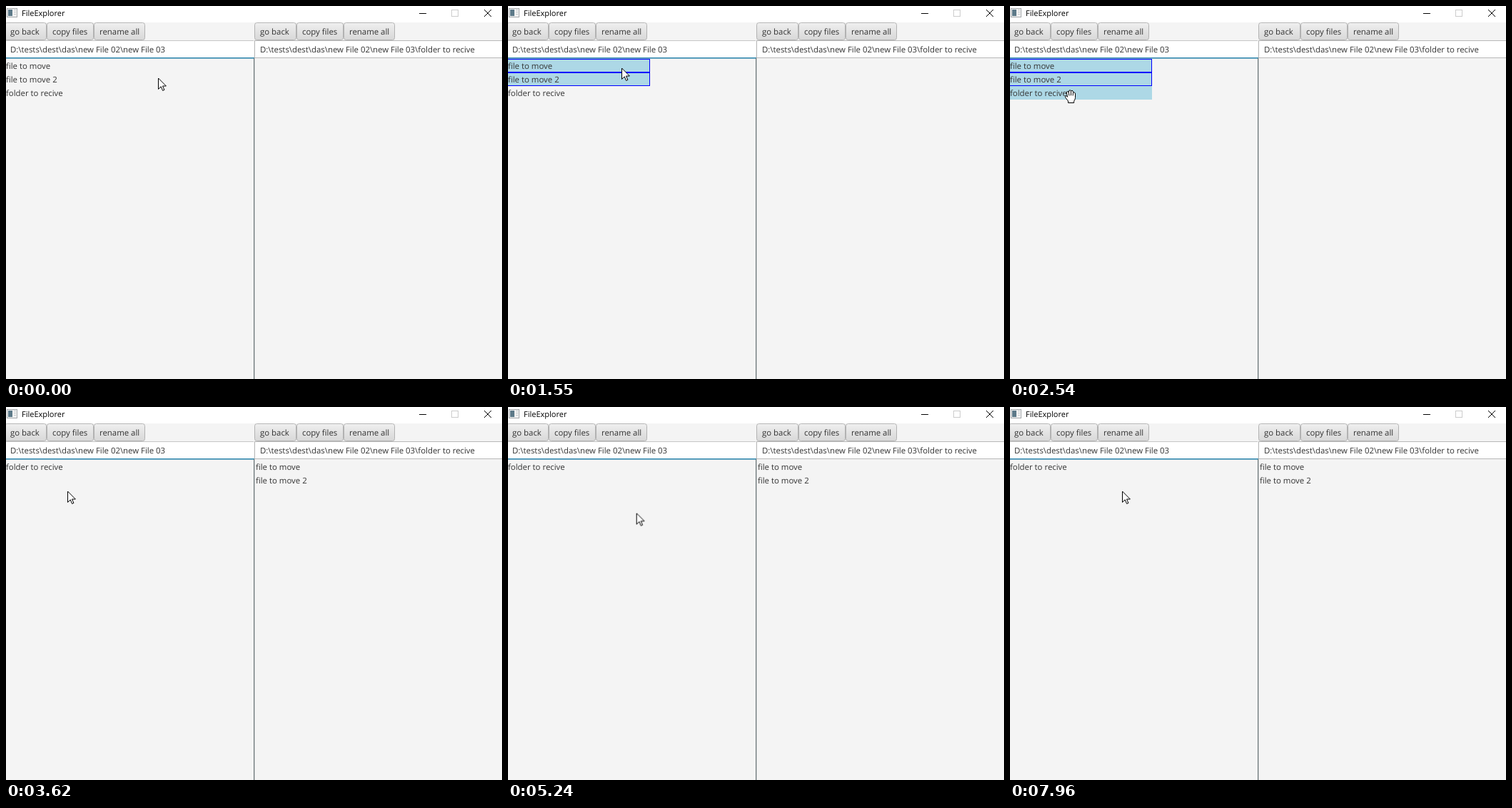
An HTML page for the animation above (8000 ms loop, 695 by 522 pixels).

```html
<!DOCTYPE html>
<html lang="en">
<head>
<meta charset="utf-8">
<title>FileExplorer</title>
<style>
html, body { margin: 0; width: 100%; height: 100%; overflow: hidden; background: #f4f4f4; }
svg { display: block; }
text { font: 11.4px "Open Sans", "Noto Sans", sans-serif; fill: #333; text-rendering: geometricPrecision; white-space: pre; }
.title { font-size: 11px; fill: #000; }
.button { fill: url(#face); stroke: #b2b2b2; }
.row rect { fill: none; stroke: none; }

.cursor, .row rect, .before, .after, .arrow, .hand { animation: 8s step-end infinite; }
.cursor { animation-name: move; }
.first  { animation-name: pick-first !important; }
.second { animation-name: pick-second !important; }
.third  { animation-name: hover-third !important; }
.before { animation-name: before; }
.after  { animation-name: after; }
.arrow  { animation-name: arrow; }
.hand   { animation-name: hand; }

@keyframes move {
  0%      { transform: translate(213px, 100px); }
  4.75%   { transform: translate(214px, 100px); }
  9.5%    { transform: translate(214px, 100px); animation-timing-function: steps(10, jump-both); }
  19.375% { transform: translate(159px, 86px); }
  20.25%  { transform: translate(159px, 86px); animation-timing-function: steps(1, jump-both); }
  21.125% { transform: translate(101px, 82px); }
  24%     { transform: translate(101px, 82px); animation-timing-function: steps(8, jump-both); }
  31.75%  { transform: translate(85px, 117px); }
  45.25%  { transform: translate(86px, 117px); animation-timing-function: steps(10); }
  54.875% { transform: translate(146px, 143px); }
  55.875% { transform: translate(149px, 144px); animation-timing-function: steps(7); }
  62.625% { transform: translate(180px, 149px); }
  65.5%   { transform: translate(180px, 149px); animation-timing-function: steps(5, jump-both); }
  70.25%  { transform: translate(178px, 141px); }
  74.25%  { transform: translate(178px, 141px); animation-timing-function: steps(2, jump-both); }
  76.125% { transform: translate(180px, 140px); }
  93.75%  { transform: translate(180px, 140px); animation-timing-function: steps(6, jump-both); }
  99.5%, 100% { transform: translate(157px, 117px); }
}
@keyframes pick-second {
  0%    { fill: none; stroke: none; }
  12.4% { fill: #add8e6; stroke: none; }
  14.4%, 100% { fill: #add8e6; stroke: #00f; }
}
@keyframes pick-first {
  0%    { fill: none; stroke: none; }
  16.4% { fill: #add8e6; stroke: none; }
  18.4%, 100% { fill: #add8e6; stroke: #00f; }
}
@keyframes hover-third {
  0% { fill: none; }
  29.8%, 100% { fill: #add8e6; }
}
@keyframes before {
  0% { visibility: visible; }
  34.625%, 100% { visibility: hidden; }
}
@keyframes after {
  0% { visibility: hidden; }
  34.625%, 100% { visibility: visible; }
}
@keyframes arrow {
  0% { visibility: visible; }
  24% { visibility: hidden; }
  34.625%, 100% { visibility: visible; }
}
@keyframes hand {
  0% { visibility: hidden; }
  24% { visibility: visible; }
  34.625%, 100% { visibility: hidden; }
}
</style>
</head>
<body>
<svg width="695" height="522" viewBox="0 0 695 522">
  <defs>
    <linearGradient id="face" x2="0" y2="1">
      <stop offset="0" stop-color="#fafafa"/>
      <stop offset=".08" stop-color="#ededed"/>
      <stop offset="1" stop-color="#d8d8d8"/>
    </linearGradient>
    <g id="tools">
      <rect class="button" x="-1.5" y="23.5" width="58" height="24" rx="3"/>
      <rect class="button" x="57.5" y="23.5" width="65" height="24" rx="3"/>
      <rect class="button" x="123.5" y="23.5" width="71" height="24" rx="3"/>
      <text x="6" y="40">go back</text>
      <text x="65" y="40">copy files</text>
      <text x="131" y="40">rename all</text>
    </g>
  </defs>

  <rect width="695" height="522" fill="#f4f4f4"/>

  <!-- Title bar -->
  <rect width="695" height="23" fill="#fff"/>
  <rect x="1.5" y="3.5" width="14" height="12" fill="#f2f2f2" stroke="#a5a9ac"/>
  <rect x="3" y="5" width="6" height="9" fill="#5d7a89"/>
  <path d="M11 5.5h3M11 8.5h3M11 11.5h3" stroke="#c2c7ca"/>
  <text class="title" x="22" y="14">FileExplorer</text>
  <g fill="none" stroke="#000">
    <path d="M579 10.5h10"/>
    <rect x="624.5" y="5.5" width="9" height="9" stroke="#ccc"/>
    <path d="M670 5l10 10m0-10l-10 10"/>
  </g>

  <!-- Toolbars and path fields -->
  <use href="#tools"/>
  <use href="#tools" x="350"/>
  <rect x="-2" y="49" width="349" height="23" fill="#fff"/>
  <path d="M0 48.5H347" stroke="#c6c6c6"/>
  <rect x="348.5" y="48.5" width="350" height="24" fill="#fff" stroke="#b8b8b8"/>
  <rect y="72" width="348" height="1.6" fill="#2f86ad"/>
  <rect x="347" y="73" width="1.3" height="449" fill="#6a7478"/>
  <text x="6" y="65">D:\tests\dest\das\new File 02\new File 03</text>
  <text x="356" y="65">D:\tests\dest\das\new File 02\new File 03\folder to recive</text>

  <!-- File lists -->
  <g class="before">
    <g class="row">
      <rect class="first" x="-.5" y="74.5" width="199" height="18"/>
      <rect class="second" x="-.5" y="93.5" width="199" height="18"/>
      <rect class="third" x="-1" y="112" width="200" height="19"/>
    </g>
    <text y="88">file to move</text>
    <text y="107">file to move 2</text>
    <text y="126">folder to recive</text>
  </g>
  <g class="after">
    <text y="88">folder to recive</text>
    <text x="350" y="88">file to move</text>
    <text x="350" y="107">file to move 2</text>
  </g>

  <g class="cursor" fill="#fff" stroke="#000" stroke-linejoin="round">
    <path class="arrow" stroke-linejoin="miter" stroke-miterlimit="2" d="M.5 1V16.4L4.2 12.8 6.6 18.4 8.9 17.4 6.5 12H11.4Z"/>
    <g class="hand">
      <path d="M-3.5 18.5V16L-7 11.5Q-8.2 9.2-6.8 8.7Q-5.6 8.4-4.5 10.3L-5.6 4.2Q-5.6 2.5-4.3 2.5Q-3.2 2.5-2.9 4L-2.4 2Q-2 .6-.8.8Q.4 1 .4 2.4Q.8 1.2 2 1.3Q3.3 1.5 3.4 3.2V4.6Q4 3.6 5 3.8Q6.8 4.2 6.5 7V11.5Q6.3 14 4.6 16.2V18.5Z"/>
      <path fill="none" d="M-2.9 4L-2 8.5M.4 2.4V8.3M3.4 4.6L3.1 8.5"/>
    </g>
  </g>
</svg>
</body>
</html>
```
